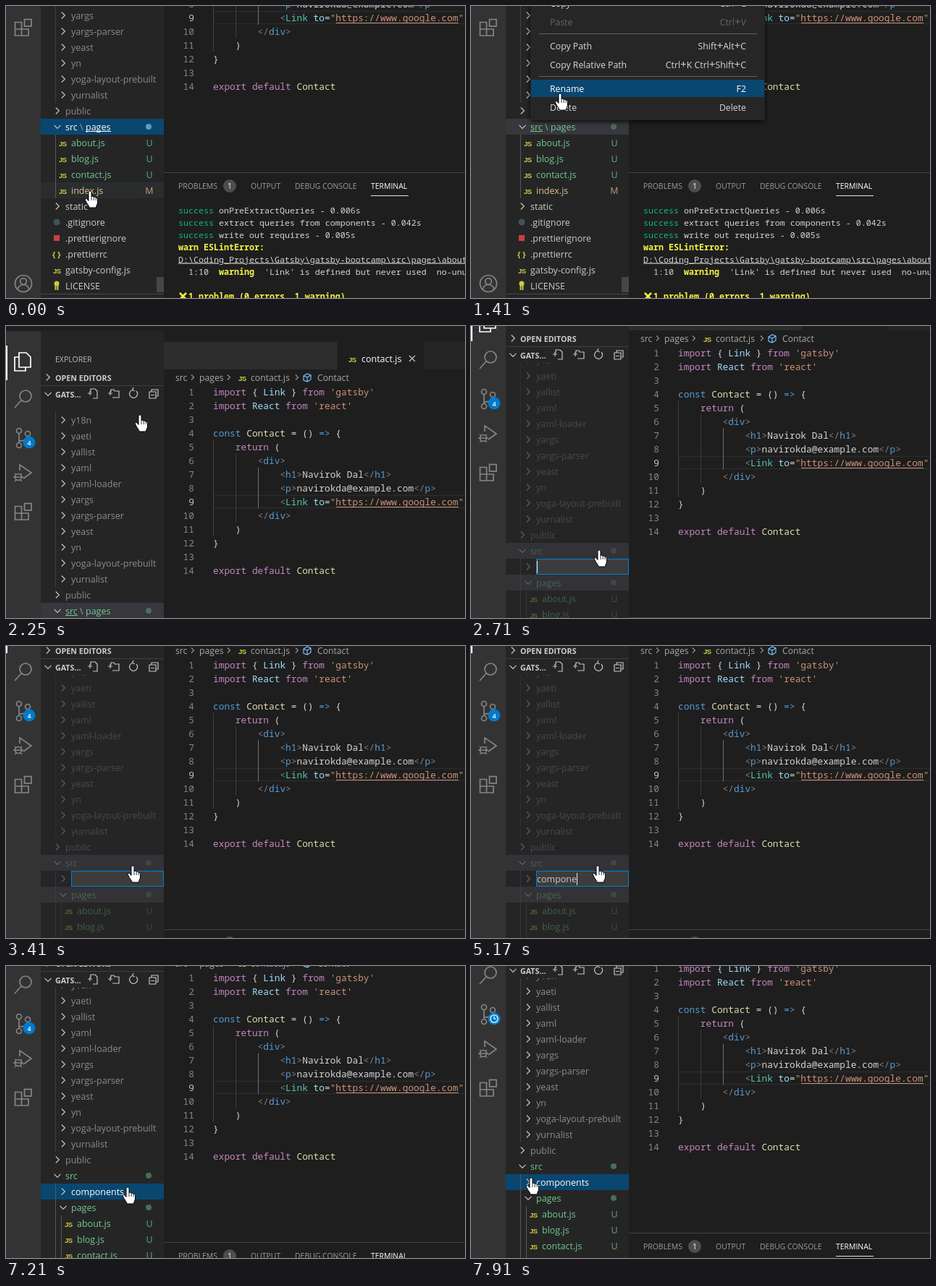
Write an HTML page that moves like this. It is 634 by 404 pixels and loops after 7.99 s.

```html
<!DOCTYPE html>
<html lang="en">
<head>
<meta charset="utf-8">
<title>Creating a folder in the editor</title>
<style>
html, body { margin: 0; width: 100%; height: 100%; overflow: hidden; background: #1e1e1e; }
svg { display: block; width: 100vw; height: 100vh; }
text { white-space: pre; font: 12.5px "Open Sans", "Noto Sans", sans-serif; }
.mono { font: 500 12.83px "Noto Sans Mono", "DejaVu Sans Mono", monospace; }
.term { font: 500 11.66px "Noto Sans Mono", "DejaVu Sans Mono", monospace; }
.menu { font-size: 12.3px; }
.plus { font-size: 15.3px; }
.head { font-size: 10.7px; font-weight: 700; }
.tab { font-size: 10.45px; }
.js { font: 700 9.6px "Liberation Sans", sans-serif; letter-spacing: -.5px; }
.line { fill: none; stroke: #c5c5c5; stroke-width: 1.2; }
.icon { fill: none; stroke: #858585; stroke-width: 1.7; }
</style>
</head>
<body>
<svg id="stage" viewBox="0 0 634 404" preserveAspectRatio="none"></svg>
<script>
const LOOP = 7990;
const GREEN = '#73c991', GREY = '#8c8c8c', LIGHT = '#cccccc', AMBER = '#e2c08d', YELLOW = '#cbcb41';

// Helpers: y is always the middle of the line of text.
const esc = s => s.replace(/&/g, '&amp;').replace(/</g, '&lt;');
const rect = (x, y, w, h, fill, more = '') =>
  `<rect x="${x}" y="${y}" width="${w}" height="${h}" fill="${fill}" ${more}/>`;
const disc = (x, y, r, fill, more = '') => `<circle cx="${x}" cy="${y}" r="${r}" fill="${fill}" ${more}/>`;
const path = (d, cls = 'line', more = '') => `<path d="${d}" class="${cls}" ${more}/>`;
const text = (x, y, s, fill, more = '') => `<text x="${x}" y="${y + 4.5}" fill="${fill}" ${more}>${esc(s)}</text>`;
const group = (id, body, more = '') => `<g id="${id}" ${more}>${body}</g>`;
const chevron = (x, y, open) =>
  path(open ? `M${x - 4.5} ${y - 2.2}l4.5 4.5 4.5-4.5` : `M${x - 2.2} ${y - 4.5}l4.5 4.5-4.5 4.5`);

const INK = {
  p: 'fill="#c586c0"', w: 'fill="#d4d4d4"', v: 'fill="#9cdcfe"', o: 'fill="#ce9178"',
  b: 'fill="#569cd6"', f: 'fill="#dcdcaa"', g: 'fill="#808080"', t: 'fill="#4ec9b0"',
  G: 'fill="#0dbc79"', c: 'fill="#d4d4d4"',
  B: 'fill="#f5f543" font-weight="700"', U: 'fill="#d4d4d4" text-decoration="underline"'
};
// Each part starts with its ink letter; parts are split by "|".
const inked = (x, y, parts, cls) => `<text x="${x}" y="${y + 4.5}" class="${cls}">` +
  parts.split('|').map(p => `<tspan ${INK[p[0]]}>${esc(p.slice(1))}</tspan>`).join('') + '</text>';

// Editor
const CODE = [
  "pimport |w{ |vLink |w} |pfrom |o'gatsby'",
  "pimport |vReact |pfrom |o'react'",
  'w',
  'bconst |fContact |w= () |b=> |w{',
  'w    |preturn |w(',
  'w        |g<|bdiv|g>',
  'w            |g<|bh1|g>|wNavirok Dal|g</|bh1|g>',
  'w            |g<|bp|g>|wnavirokda@example.com|g</|bp|g>',
  'w            |g<|tLink |vto|w=|o"https://www.google.com"',
  'w        |g</|bdiv|g>',
  'w    )',
  'w}',
  'w',
  'pexport default |fContact'
];
const lineY = n => 19 * n - 155;

function editor() {
  const guide = (x, a, b, col) => rect(x, lineY(a) - 9.5, 1, (b - a + 1) * 19, col);
  const lines = CODE.map((src, i) => {
    const n = i + 1, y = lineY(n);
    return text(260, y, String(n), n === 9 ? '#c6c6c6' : '#858585', 'class="mono" text-anchor="end"') +
      inked(286, y, src, 'mono');
  }).join('');
  return rect(218, -220, 416, 700, '#1e1e1e') +
    rect(218, -205, 416, 38, '#252526') + rect(218, -205, 239, 38, '#2d2d2d') + rect(458, -205, 119, 38, '#1e1e1e') +
    text(473, -182, 'JS', YELLOW, 'class="js"') + text(491, -182, 'contact.js', '#ffffff') +
    path('M557-186l8 8m0-8l-8 8') +
    ['src', 'pages', 'contact.js', 'Contact'].map((s, i) =>
      text([234, 267, 338, 430][i], -156, s, '#a9a9a9', 'style="font-size:12.2px"')).join('') +
    [258, 308, 402].map(x => path(`M${x - 2}-159.500l3.500 3.500-3.500 3.500`, 'line', 'opacity=".7"')).join('') +
    text(321, -156, 'JS', YELLOW, 'class="js"') +
    path('M411-158l5-3 5 2v6l-5 3-5-2zl5 2 5-3m-5 3v6', 'line', 'style="stroke:#75beff"') +
    rect(287, lineY(9) - 8.5, 360, 17, 'none', 'stroke="#2b2b2b" stroke-width="1.5"') +
    guide(286, 5, 11, '#404040') + guide(317, 6, 10, '#404040') + guide(348, 7, 9, '#707070') +
    lines + rect(456, lineY(9) + 7, 169, 1, '#ce9178');
}

// Bottom panel
function panel() {
  const tabs = [[238, 'PROBLEMS'], [338, 'OUTPUT'], [399, 'DEBUG CONSOLE'], [504, 'TERMINAL']];
  const log = [
    'Gsuccess|c onPreExtractQueries - 0.006s',
    'Gsuccess|c extract queries from components - 0.042s',
    'Gsuccess|c write out requires - 0.005s',
    'Bwarn ESLintError:',
    'UD:\\Coding_Projects\\Gatsby\\gatsby-bootcamp\\src\\pages\\about',
    "c  1:10  |Bwarning|c  'Link' is defined but never used  no-unused-vars",
    'c',
    'B  1 problem (0 errors, 1 warning)'
  ];
  return rect(218, 230, 416, 1, '#414141') +
    tabs.map(([x, s], i) => text(x, 248.500, s, i === 3 ? '#ffffff' : '#9d9d9d', 'class="tab"')).join('') +
    rect(504, 262, 52, 1, '#e7e7e7') + disc(309, 249, 9, '#4d4d4d') +
    text(309, 248.500, '1', '#ffffff', 'class="tab" text-anchor="middle"') +
    log.map((s, i) => inked(238, 282 + 17 * i, s, 'term')).join('') +
    path('M240 397l9 9m0-9l-9 9', 'line', 'style="stroke:#f5f543;stroke-width:2.6"');
}

// Activity bar
function activity() {
  return rect(0, -220, 48, 700, '#333333') + rect(0, -200, 2, 48, '#ffffff') +
    path('M18-190h10l6 6v14h-16zM18-184h-6v19h15v-5', 'icon', 'style="stroke:#fff"') +
    disc(27, -130, 8, 'none', 'class="icon"') + path('M21-124l-9 10', 'icon') +
    [[18, -82], [30, -78], [18, -62]].map(([x, y]) => disc(x, y, 3.5, 'none', 'class="icon"')).join('') +
    path('M18-78v12M30-74q0 6-12 6', 'icon') +
    disc(32, -66, 8.5, '#007acc') +
    group('count', text(32, -66.500, '4', '#fff', 'text-anchor="middle" style="font-size:9px;font-weight:600"')) +
    group('clock', disc(32, -66, 5.2, 'none', 'stroke="#fff" stroke-width="1.3"') +
      path('M32-69.500v3.500h3', 'line', 'style="stroke:#fff"')) +
    path('M19-27v-8l16 11-11 8', 'icon') + disc(17, -18, 4.5, 'none', 'class="icon"') +
    path('M12.500-18h9M12-23l2 2m8-2l-2 2M10-18h2.500m9 0h2.500M12-12l2-2m8 2l-2-2', 'icon', 'style="stroke-width:1.3"') +
    path('M12.500 22.500h9v18.500h-9zM12.500 32h18.500v9h-18.500', 'icon') +
    rect(25.5, 18.5, 9.5, 9.5, 'none', 'class="icon"') +
    disc(24, 384, 11.5, 'none', 'class="icon"') + disc(24, 381, 4.3, 'none', 'class="icon"') +
    path('M16 392q2-6.500 8-6.500t8 6.500', 'icon');
}

// File tree
const MODULES = ['y18n', 'yaeti', 'yallist', 'yaml', 'yaml-loader', 'yargs', 'yargs-parser', 'yeast', 'yn',
  'yoga-layout-prebuilt', 'yurnalist'];
const PAGES = ['about.js', 'blog.js', 'contact.js', 'index.js'];
const folder = (x, y, s, fill, open) => chevron(x, y, open) + text(x + 11, y, s, fill);
const modules = top => rect(68, top - 253, 1, 242, '#3f3f3f') +
  MODULES.map((s, i) => folder(79, top - 22 * (MODULES.length - i), s, GREY)).join('') +
  folder(71, top, 'public', GREY);
const pages = (x, top) => PAGES.map((s, i) => {
  const y = top + 22 * i, own = i === 3, fill = own ? AMBER : GREEN;
  return text(x - 17, y, 'JS', YELLOW, 'class="js"') + text(x, y, s, fill) +
    text(198, y, own ? 'M' : 'U', fill, 'text-anchor="middle" opacity=".8" font-weight="600"');
}).join('');

function treeBefore() {
  const names = ['.gitignore', '.prettierignore', '.prettierrc', 'gatsby-config.js', 'LICENSE'];
  return rect(48, 0, 170, 22, '#2a2d2e', 'id="hover"') + rect(48, 156, 170, 22, '#094771', 'id="pick"') +
    modules(145) + chevron(71, 167, true) +
    group('names', text(82, 167, 'src', 'inherit') + text(110, 167, 'pages', 'inherit')) +
    text(102, 167, '\\', '#8fa3ad') +
    rect(82, 173, 17, 1, GREEN, 'id="underSrc"') + rect(110, 173, 35, 1, '#fff', 'id="underPages"') +
    disc(197, 167, 4, '#5b9cc0', 'id="dot"') +
    rect(68, 178, 1, 88, '#585858') + pages(90, 189) + folder(71, 277, 'static', LIGHT) +
    names.map((s, i) => text(82, 299 + 22 * i, s, LIGHT)).join('') +
    disc(70, 299, 4.5, '#41535b') + rect(66, 317, 8, 8, '#cc3e44') +
    text(64, 343, '{ }', YELLOW, 'style="font-size:11px;font-weight:700"') +
    text(65, 365, 'JS', YELLOW, 'class="js"') +
    disc(70, 384, 3.5, YELLOW) + path('M68.500 386v7m3-7v7', 'line', `style="stroke:${YELLOW};stroke-width:2"`);
}

function treeAfter() {
  return group('editBars', rect(48, 127, 170, 22, '#323237') + rect(48, 171, 170, 22, '#323237')) +
    rect(48, 149, 170, 22, '#094771', 'id="made"') +
    group('rows', modules(116) + folder(71, 138, 'src', GREEN, true) + disc(197, 138, 4, GREEN, 'opacity=".45"') +
      rect(68, 149, 1, 154, '#585858') + chevron(79, 160) +
      folder(79, 182, 'pages', GREEN, true) + disc(197, 182, 4, GREEN, 'opacity=".45"') +
      rect(76, 193, 1, 88, '#585858') + pages(98, 204)) +
    group('madeName', text(90, 160, 'components', '#ffffff')) +
    group('input', rect(90.5, 149.5, 127, 21, '#3c3c3c', 'stroke="#007fd4"') +
      text(91, 160, '', LIGHT, 'id="typed"') + rect(91, 152, 1, 17, '#e8e8e8', 'id="caret"'));
}

function sidebar() {
  return rect(48, -220, 170, 700, '#252526') +
    text(68, -182, 'EXPLORER', '#bbbbbb', 'style="font-size:10.5px"') +
    '<g clip-path="url(#treeBox)">' + group('before', treeBefore()) + group('after', treeAfter()) + '</g>' +
    rect(208, 375, 10, 21, '#464646') + rect(48, 398, 170, 1, '#484848') +
    chevron(58, -156) + text(68, -156, 'OPEN EDITORS', LIGHT, 'class="head"') +
    rect(48, -145, 170, 1, '#3f3f40') +
    chevron(58, -133, true) + text(68, -133, 'GATS...', LIGHT, 'class="head"') +
    path('M117-136v-4h6l3 3v10h-6M113-134h6m-3-3v6') +
    path('M145-136v-3h4l1 2h6v9h-9M141-134h6m-3-3v6') +
    path('M180-137a5.500 5.500 0 1 1-5-1.500M176-142l-1.500 3.500 3.500 1.500') +
    path('M201-136v-3h9v9h-3M198-136h9v9h-9zM200-131.500h5');
}

// Context menu
const MENU = [
  [-172, 'New File', ''], [-147, 'New Folder', ''], [-122, 'Reveal in File Explorer', 'Shift+Alt+R'],
  [-96, 'Open in Integrated Terminal', ''], [-63, 'Find in Folder...', 'Shift+Alt+F'],
  [-29, 'Cut', 'Ctrl+X'], [-4, 'Copy', 'Ctrl+C'], [22, 'Paste', 'Ctrl+V'],
  [55, 'Copy Path', 'Shift+Alt+C'], [81, 'Copy Relative Path', 'Ctrl+K Ctrl+Shift+C'],
  [114, 'Rename', 'F2'], [140, 'Delete', 'Delete']
];
const menu = () => rect(82, -190, 324, 348, '#252526', 'filter="url(#shadow)"') +
  rect(83, 0, 322, 24, '#094771', 'id="menuPick"') +
  [-80, -46, 38, 97].map(y => rect(94, y, 301, 1, '#606060')).join('') +
  MENU.map(([y, name, keys], i) => {
    const shortcut = text(380, y, keys, 'inherit', 'class="menu" text-anchor="end"');
    return group('item' + i, text(109, y, name, 'inherit', 'class="menu"') +
      shortcut.replace(/\+/g, '<tspan class="plus">+</tspan>'));
  }).join('');

const HAND = 'M-2 2C-2-.7 2-.7 2 2V8C2.500 6.600 5 7 5.200 8.700 6 7.600 8 8 8.200 9.700 9.200 9 10.500 9.600 10.500 11.500' +
  'V16C10.500 18 8.500 20 8.500 23H-1C-1 21-3 19-4.500 16.500L-6.500 12.800C-7.500 10.800-5 9.700-3.700 11.500L-2 13.500Z';

const stage = document.getElementById('stage');
stage.innerHTML = `<defs><clipPath id="treeBox"><rect x="48" y="-122" width="170" height="520"/></clipPath>
  <filter id="shadow" x="-10%" y="-10%" width="120%" height="120%">
  <feDropShadow dx="0" dy="2" stdDeviation="3" flood-color="#000" flood-opacity=".8"/></filter></defs>` +
  group('world', editor() + panel() + activity() + sidebar() + group('menu', menu()) +
    group('hand', `<path d="${HAND}" fill="#fff" stroke="#000" stroke-width="1"/>` +
      path('M2 8v5M5.200 9v4M8.200 10v3', 'line', 'style="stroke:#000;stroke-width:.8"')));

const el = {};
stage.querySelectorAll('[id]').forEach(e => { el[e.id] = e; });
const show = (id, on) => { el[id].style.display = on ? '' : 'none'; };

// Bursts of motion: start, end, number of steps
const BURSTS = [[80, 400, 5], [710, 1490, 11], [1560, 1870, 5], [2180, 2870, 10],
  [6360, 6590, 4], [7210, 7600, 6], [7750, 7910, 3]];
// Time, pointer x and y, view shift
const KEYS = [[0, 116, 256, 0], [400, 82, 160, 0], [710, 84, 157, 0], [1412, 123, 121, 0], [1490, 134, 60, 20],
  [1715, 180, -106, 185], [1870, 186, -147, 227], [2180, 186, -147, 227], [2563, 180, 70, 227],
  [2717, 177, 137, 173], [2870, 175, 142, 162], [6590, 175, 142, 162], [7210, 168, 154, 152],
  [7600, 84, 165, 139], [7910, 83, 154, 139]];
const TYPING = [[3790, 2], [4020, 3], [4250, 4], [4480, 5], [4710, 6], [5170, 7], [5250, 8], [5420, 9], [5660, 10]];

function snap(t) {
  let out = 0;
  for (const [a, b, n] of BURSTS) {
    if (t + 10 < a) break;
    const step = (b - a) / (n - 1);
    out = a + step * Math.min(n - 1, Math.floor((t + 10 - a) / step));
  }
  return out;
}

function pose(t) {
  const i = KEYS.findIndex(k => k[0] > t);
  if (i < 0) return KEYS[KEYS.length - 1].slice(1);
  const a = KEYS[i - 1], b = KEYS[i], f = (t - a[0]) / (b[0] - a[0]);
  return [1, 2, 3].map(j => a[j] + (b[j] - a[j]) * f);
}

function draw(t) {
  const [x, y, shift] = pose(snap(t)).map(Math.round);
  el.world.setAttribute('transform', `translate(0 ${shift})`);
  el.hand.setAttribute('transform', `translate(${x} ${y})`);

  const after = t >= 2480, editing = after && t < 6360, menuOn = t >= 700 && t < 2180;
  show('before', !after);
  show('after', after);
  show('menu', menuOn);

  const focused = t < 700;
  el.pick.setAttribute('fill', focused ? '#094771' : '#37373d');
  el.names.setAttribute('fill', focused ? '#ffffff' : GREEN);
  el.dot.setAttribute('fill', focused ? '#5b9cc0' : '#52695e');
  show('underSrc', !focused);
  show('underPages', focused);
  show('hover', focused);
  el.hover.setAttribute('y', 156 + 22 * Math.floor((y - 156) / 22));

  const item = MENU.find(m => Math.abs(m[0] - y) < 13 && m[1] !== 'Paste');
  show('menuPick', item);
  if (item) el.menuPick.setAttribute('y', item[0] - 12);
  MENU.forEach((m, i) => el['item' + i].setAttribute('fill',
    m === item ? '#ffffff' : m[1] === 'Paste' ? '#656565' : '#d8d8d8'));

  show('editBars', editing);
  show('input', editing);
  show('made', !editing);
  show('madeName', !editing);
  el.rows.setAttribute('opacity', editing ? 0.35 : 1);
  if (editing) {
    const typed = TYPING.reduce((n, [at, len]) => t >= at ? len : n, 0);
    el.typed.textContent = 'components'.slice(0, typed);
    el.caret.setAttribute('x', 91 + Math.round(typed ? el.typed.getComputedTextLength() : 0));
    show('caret', !(t >= 3410 && t < 3790) && t < 6190);
  }
  show('count', t < 7750);
  show('clock', t >= 7750);
}

const start = performance.now();
function tick() {
  draw((performance.now() - start) % LOOP);
  requestAnimationFrame(tick);
}
tick();
</script>
</body>
</html>
```
